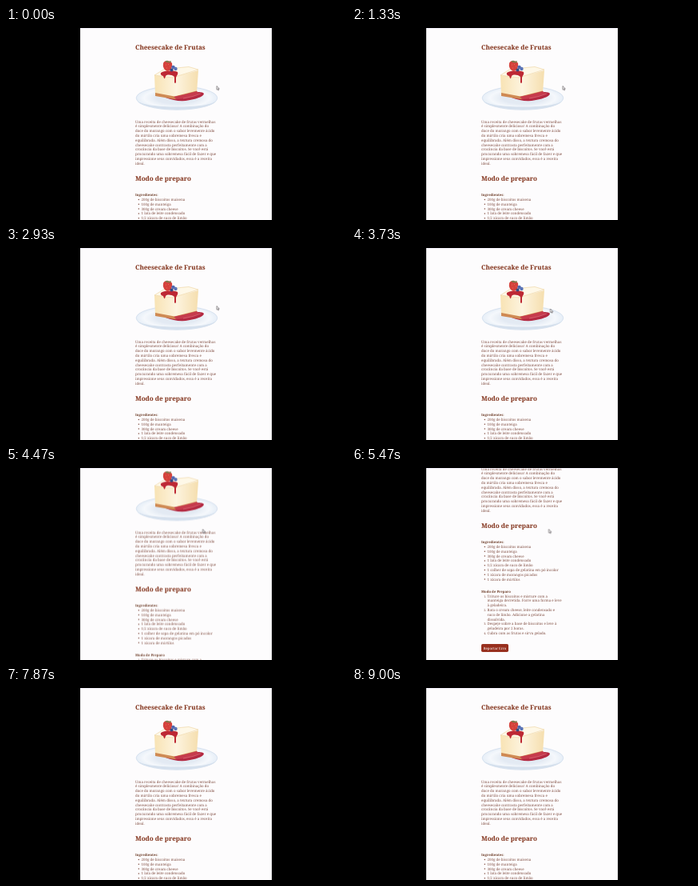
Animation of 426x240 px, one loop 9.07 s. Source, as an HTML page:

```html
<!DOCTYPE html>
<html lang="pt-BR">
<head>
<meta charset="utf-8">
<title>Cheesecake de Frutas</title>
<style>
  html, body { margin: 0; width: 100%; height: 100%; overflow: hidden; background: #000; }
  svg { display: block; width: 100vw; height: 100vh; }
  text { font: 4.47px "Noto Serif", serif; fill: #825044; text-rendering: geometricPrecision; }
  .title { font-size: 8.05px; font-weight: 700; fill: #803018; }
  .label { font-size: 4.25px; font-weight: 700; fill: #70402c; }
  .number { text-anchor: end; font-size: 3.8px; }
  .button { font-size: 4.3px; fill: #fff; text-anchor: middle; }
  #page { animation: scroll 9070ms infinite; }
  #cursor { animation: point 9070ms infinite; }
  @keyframes scroll {
    0%, 43.6% { transform: translateY(0); animation-timing-function: ease-in-out; }
    58.2%, 73.9% { transform: translateY(-116px); animation-timing-function: ease-in-out; }
    81.6%, 100% { transform: translateY(0); }
  }
  @keyframes point {
    0%, 35% { transform: translate(264px, 72.5px); animation-timing-function: ease-in-out; }
    43%, 76% { transform: translate(246.5px, 76.5px); animation-timing-function: ease-in; }
    84%, 99.99% { transform: translate(338px, 90px); }
    100% { transform: translate(264px, 72.5px); }
  }
</style>
</head>
<body>
<svg viewBox="0 0 426 240">
  <defs>
    <clipPath id="view"><rect x="93" width="240" height="240"/></clipPath>
    <linearGradient id="cream">
      <stop stop-color="#f8e3b4"/><stop offset=".5" stop-color="#fdf4df"/><stop offset="1" stop-color="#f5deae"/>
    </linearGradient>
    <radialGradient id="plate">
      <stop offset=".5" stop-color="#e3eaf3"/><stop offset=".8" stop-color="#f5f8fc"/><stop offset="1" stop-color="#e6eef7"/>
    </radialGradient>
  </defs>
  <rect width="426" height="240"/>
  <g clip-path="url(#view)">
    <rect x="93" width="240" height="240" fill="#fdfcfd"/>
    <g id="page">
      <g id="cake">
        <ellipse cx="214" cy="87.500" rx="50.800" ry="14.800" fill="url(#plate)" stroke="#c6d5e8" stroke-width=".6"/>
        <path d="M164 91C174 105 253 106 264 91C254 101 175 101 164 91" fill="#d5e0ed"/>
        <path d="M200 87C212 82 240 78 247 81C251 84 240 89 225 91Q212 92 200 87" fill="#b42a42"/>
        <path d="M186 59L208 62L241 53L239 81L211 88L187 84Z" fill="url(#cream)"/>
        <path d="M187 81L211 85.500L239 78.500V81.500L211 89L187 85Z" fill="#cf8a53"/>
        <path d="M186 59L198 51.500L229 48.500L241 52L209 62Z" fill="#fef8e8" stroke="#e9c888" stroke-width=".5"/>
        <path d="M194 56C199 53 210 53 215 55C216 58 214 59 213 62V68Q212 70 211 68V61C207 58 202 58 200 60L199 63Q198 64 197 60Q193 59 194 56Z" fill="#bd2834"/>
        <path d="M210 86Q225 83 239 79L243 82Q229 88 214 89Z" fill="#c63b4c"/>
        <path d="M197 45C197 40 206 40 208 44C209 49 206 54 202 54C199 53 196 49 197 45Z" fill="#d5413c"/>
        <path d="M199 42L202 40.500L204 42L207 41L206 43.500L202 43Z" fill="#768250"/>
        <path d="M200 46h.5M203 45.500h.5M205 48h.5M201 50h.5" stroke="#ffd68a" stroke-width=".6"/>
        <circle cx="209.500" cy="49" r="2.300" fill="#5269af"/>
        <circle cx="207.500" cy="52.500" r="2.100" fill="#39497f"/>
        <circle cx="212.500" cy="51" r="2.200" fill="#5874b9"/>
        <path d="M222 88Q235 86 244 82" fill="none" stroke="#e47a87" stroke-width=".6"/>
      </g>
      <g id="copy"></g>
      <rect x="162" y="336" width="34" height="10" rx="1.800" fill="#98301f"/>
      <text class="button" x="179" y="342.500">Reportar Erro</text>
    </g>
    <path d="M93 .3H333" stroke="#d9d7ea" stroke-width=".6"/>
    <path id="cursor" d="M0 0V4.600L1.100 3.700L1.900 5.300L2.700 4.900L1.900 3.400H3.300Z" fill="#fff" stroke="#514a50" stroke-width=".6"/>
  </g>
</svg>
<script>
  const copy = document.getElementById("copy");
  const pitch = 5.8;

  function add(tag, attributes, content = "") {
    const node = document.createElementNS("http://www.w3.org/2000/svg", tag);
    for (const [key, value] of Object.entries(attributes)) node.setAttribute(key, value);
    node.textContent = content;
    copy.append(node);
  }
  const write = (content, x, y, style = "body") => add("text", { x, y, class: style }, content);

  const intro = `Uma receita de cheesecake de frutas vermelhas
é simplesmente deliciosa! A combinação do
doce do morango com o sabor levemente ácido
do mirtilo cria uma sobremesa fresca e
equilibrada. Além disso, a textura cremosa do
cheesecake contrasta perfeitamente com a
crocância da base de biscoitos. Se você está
procurando uma sobremesa fácil de fazer e que
impressione seus convidados, essa é a receita
ideal.`;
  const ingredients = `200g de biscoitos maisena
100g de manteiga
300g de cream cheese
1 lata de leite condensado
1/2 xícara de suco de limão
1 colher de sopa de gelatina em pó incolor
1 xícara de morangos picados
1 xícara de mirtilos`;
  const steps = [
    "Triture os biscoitos e misture com a\nmanteiga derretida. Forre uma forma e leve\nà geladeira.",
    "Bata o cream cheese, leite condensado e\nsuco de limão. Adicione a gelatina\ndissolvida.",
    "Despeje sobre a base de biscoitos e leve à\ngeladeira por 2 horas.",
    "Cubra com as frutas e sirva gelado."
  ];

  write("Cheesecake de Frutas", 162, 27, "title");
  intro.split("\n").forEach((line, i) => write(line, 162, 118.5 + i * pitch));
  write("Modo de preparo", 162, 191, "title");
  write("Ingredientes:", 162, 209.8, "label");
  ingredients.split("\n").forEach((line, i) => {
    const y = 216 + i * pitch;
    add("circle", { cx: 166.3, cy: y - 1.5, r: 0.75, fill: "#825044" });
    write(line, 169.5, y);
  });
  write("Modo de Preparo", 162, 271.5, "label");
  let y = 277.5;
  steps.forEach((step, i) => {
    write(`${i + 1}.`, 168.3, y, "number");
    for (const line of step.split("\n")) {
      write(line, 169.5, y);
      y += pitch;
    }
  });
</script>
</body>
</html>
```
